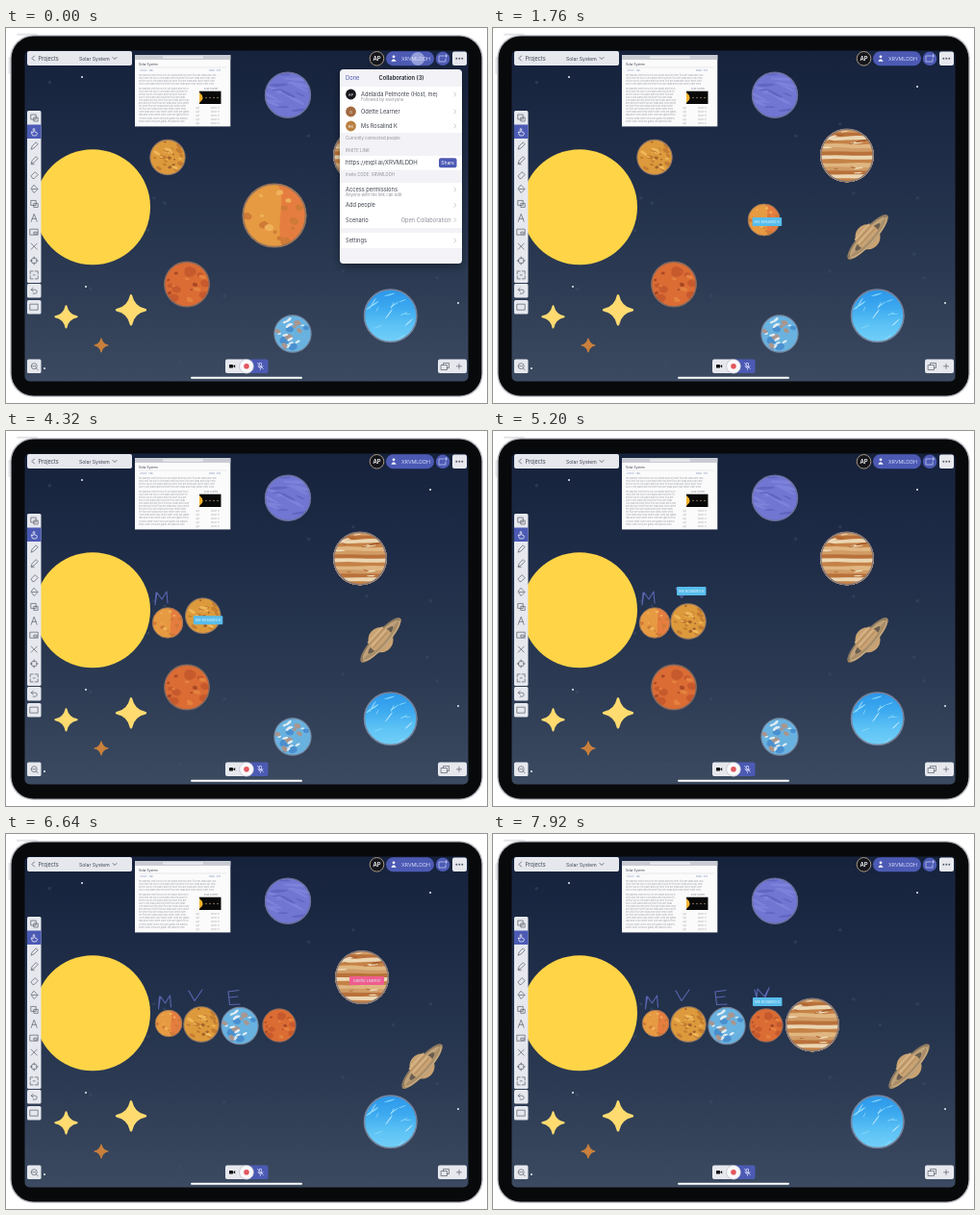
Write an HTML page that moves like this. It is 500 px wide and 390 px high and loops after 8000 ms.

```html
<!DOCTYPE html>
<html lang="en">
<head>
<meta charset="utf-8">
<title>Solar system board</title>
<style>
html, body { margin: 0; width: 100%; height: 100%; overflow: hidden; background: #fff; }
svg { display: block; width: 500px; height: 390px; }
text { font-family: Inter, "Liberation Sans", sans-serif; }
</style>
</head>
<body>
<svg id="stage" viewBox="0 0 500 390" xmlns="http://www.w3.org/2000/svg"></svg>
<script>
const LOOP = 8000;
const BLUE = '#4c5ab4', PALE = '#e6e8ee', INK = '#3f434f', GREY = '#8b8e98';
const stage = document.getElementById('stage');

// ---- helpers ----
const repeat = (n, make) => Array.from({ length: n }, (_, i) => make(i)).join('');
const rect = (x, y, w, h, fill, r = 0, extra = '') =>
  `<rect x="${x}" y="${y}" width="${w}" height="${h}" rx="${r}" fill="${fill}" ${extra}/>`;
const circle = (x, y, r, fill, extra = '') => `<circle cx="${x}" cy="${y}" r="${r}" fill="${fill}" ${extra}/>`;
const text = (x, y, size, str, fill = INK, extra = '') =>
  `<text x="${x}" y="${y}" font-size="${size}" fill="${fill}" ${extra}>${str}</text>`;
const line = (d, stroke = INK, w = .7, extra = '') =>
  `<path d="${d}" fill="none" stroke="${stroke}" stroke-width="${w}" stroke-linecap="round" stroke-linejoin="round" ${extra}/>`;
const middle = 'text-anchor="middle"';

function randomFrom(seed) {
  return () => {
    seed = (seed * 16807) % 2147483647;
    return seed / 2147483647;
  };
}

const gradient = (id, ...stops) =>
  `<linearGradient id="${id}" x2="0" y2="1">${stops.map((c, i) =>
    `<stop offset="${i / (stops.length - 1)}" stop-color="${c}"/>`).join('')}</linearGradient>`;

// ---- planets, drawn with radius 20 ----
const ball = (id, base, details, rim) =>
  `<g id="${id}"><g clip-path="url(#disc)">${circle(0, 0, 20, base)}${details}</g>` +
  circle(0, 0, 19.6, 'none', `stroke="${rim}" stroke-width="1.1"`) + '</g>';

// scattered ellipses; flat is height over width, tilt their common lean
function spots(seed, count, fill, size, flat = .75, tilt = 0) {
  const random = randomFrom(seed * 7919);
  return repeat(count, () => {
    const angle = random() * 2 * Math.PI, far = 18 * Math.sqrt(random()), rx = size * (.5 + random());
    const place = `translate(${far * Math.cos(angle)} ${far * Math.sin(angle)}) rotate(${tilt + 40 * (random() - .5)})`;
    return `<ellipse rx="${rx}" ry="${rx * flat}" transform="${place}" fill="${fill}"/>`;
  });
}

function bands(colors, count) {
  const random = randomFrom(4321), step = 40 / count;
  return repeat(count, i => {
    const y = -20 + step * i, wave = random() * 2 - 1;
    return `<path d="M-20 ${y}Q-7 ${y + wave} 0 ${y}T20 ${y}V21H-20Z" fill="${colors[i % colors.length]}"/>`;
  });
}

const art =
  ball('mercury', '#e69a42', '<path d="M2-20C8-8 0 4 5 20H22V-22Z" fill="#e67d40"/>' +
    spots(3, 9, '#cf7a36', 2.2) + spots(8, 5, '#efb25a', 2), '#94745c') +
  ball('venus', '#dd9a3c', spots(5, 12, '#c47d31', 3.4, .5, 25) + spots(11, 10, '#efb758', 2.8, .4, 25) +
    spots(17, 6, '#a5642b', 1.7), '#8d7565') +
  ball('earth', '#69b2e0', spots(4, 5, '#4a90cf', 4.5) + spots(13, 7, '#a8968f', 3.6, .7, 30) +
    spots(21, 12, '#e3edf3', 2.8, .4, -25), '#75839a') +
  ball('mars', '#da6c34', spots(6, 8, '#c75a2d', 3.6) + spots(15, 6, '#e5823f', 3, .5) + spots(23, 5, '#ab4926', 1.6), '#84685f') +
  ball('jupiter', '#d09a62', bands(['#d19c66', '#b9713a', '#ebd6b2', '#c58247', '#e0b681'], 14) +
    spots(9, 8, '#efdcbc', 3.4, .14) + spots(19, 6, '#a9602f', 3.4, .16), '#85797a') +
  ball('neptune', '#7176d2', spots(7, 9, '#7d82da', 8, .12, 12) + spots(16, 7, '#6065c0', 6, .15, 12), '#6b6f9b') +
  ball('uranus', 'url(#sea)', spots(12, 9, '#8fdcfa', 3.6, .1, -20) + spots(26, 5, '#c6edff', 3, .08, -50), '#76819a') +
  `<g id="saturn" transform="rotate(-48)"><ellipse rx="30.5" ry="7.8" fill="#8f7a60"/><ellipse rx="27" ry="6" fill="#bfa27a"/>` +
    `<ellipse rx="19" ry="4" fill="#6a5d50"/>${circle(0, 0, 13, '#c9a374')}` +
    repeat(4, i => line(`M-11 ${-8 + i * 2.6}H11`, i % 2 ? '#b28d60' : '#dcbd8f', 1.1)) +
    '<path d="M-30.5 0A30.5 7.8 0 0 0 30.5 0L20 0A20 4 0 0 1-20 0Z" fill="#a98e69"/>' +
    line('M-27 1A27 6 0 0 0 27 1', '#cfb38a', 1) + '</g>';

// ---- fixed parts ----
const spark = (x, y, s, fill) =>
  `<path transform="translate(${x} ${y}) scale(${s})" fill="${fill}" stroke="${fill}" stroke-width=".16" stroke-linejoin="round" ` +
  'd="M0-.93Q.16-.16 .93 0Q.16 .16 0 .93Q-.16 .16-.93 0Q-.16-.16 0-.93Z"/>';

const device =
  rect(2.5, 30, 2, 18, '#e4e4e7', 1) + rect(11, 5.8, 22, 2, '#e4e4e7', 1) +
  rect(4.3, 7.2, 491.4, 376.6, '#b9bbc2', 24) + rect(5.6, 8.5, 488.8, 374, '#08090b', 23) +
  rect(19.5, 23.5, 461, 344, 'url(#sky)', 5);

const random = randomFrom(99);
const scenery =
  repeat(18, () => circle(45 + 410 * random(), 50 + 300 * random(), 1.8, '#42526d', 'opacity=".4"')) +
  [[79, 51], [441, 61], [83, 269], [40, 354], [470, 286]].map(([x, y]) => circle(x, y, 1, '#e9eef5')).join('') +
  circle(90, 186.3, 60, '#ffd447') +
  spark(62.5, 300.3, 12, '#ffdb70') + spark(130, 293.3, 16, '#ffdb70') + spark(99, 330, 7.5, '#c9803c');

const words = 'the planets orbit the sun in one plane and the inner four are small and rocky while outer ones are giants '.repeat(2);
const prose = (x, y, chars, rows) => repeat(rows, i =>
  text(x, y + i * 3.1, 2.3, words.substr(i * 7, chars - (i * 5) % 4), '#9a9da5'));
const page = rect(134, 28, 99.3, 74.4, '#fbfbfc') + rect(134, 28, 99.3, 5, '#c9ccd3') + rect(163, 29.3, 42, 2.4, '#e6e8ec', 1) +
  text(138, 38.8, 3.2, 'Solar System') + line('M138 41H229', '#ccc', .4) +
  text(139, 45, 2.4, 'Article &#160; Talk', '#8797bb') + text(211, 45, 2.4, 'Read &#160; Edit', '#8797bb') +
  prose(138, 49.5, 76, 4) + prose(138, 63.5, 49, 12) +
  text(213, 63.5, 2.3, 'Solar System', GREY, middle) + rect(201, 65.7, 22.5, 13.3, '#090909') +
  '<path d="M201 67Q208 72.5 201 78Z" fill="#f6b52f"/>' + repeat(4, i => circle(208 + i * 4, 72.5, .7, '#b79a78')) +
  repeat(5, i => text(197, 84 + i * 4, 2.2, 'Age', '#aaa') + text(213, 84 + i * 4, 2.2, 'billion yr', '#aaa'));

// icon paths live in a box from -4 to 4
const icon = (d, x, y, c = '#5a5e69') => line(d, c, .7, `transform="translate(${x} ${y})"`);
const square = 'M-3-3H2V2H-3ZM0 0H4V4H0Z', pen = 'M-3 3L-2 0L2-4L4-2L0 2Z', ring = 'M-3 0A3 3 0 1 1 3 0A3 3 0 1 1-3 0';
const plus = 'M-2.5 0H2.5M0-2.5V2.5';
const tools = [square, 'M-2 3L-3 0L-1 1V-3Q0-4 .5-3V0L3 1V3L2 4H-1Z', pen, pen + 'M-3 4H0', 'M-3 1L1-3L4 0L0 4H-1Z',
  'M0-4L4 0L0 4L-3 0ZM-2 0H3', square, 'M-3 4L0-4L3 4M-2 1H2', 'M-4-3H4V3H-4ZM0 0H3V2H0Z', 'M-3-3L3 3M3-3L-3 3',
  ring + 'M0-4V-2M0 4V2M-4 0H-2M4 0H2', 'M-4-1V-4H-1M1-4H4V-1M4 1V4H1M-1 4H-4V1M-1 0H1'];
const cell = (y, d) => rect(22, y, 14.5, 14.5, PALE, 1.5) + icon(d, 29.2, y + 7.2);
const chrome =
  rect(22, 24, 109, 15, PALE, 2) + line('M29.5 29L27 31.5L29.5 34') + text(33.5, 33.7, 5.5, 'Projects') +
  text(76, 33.7, 5.1, 'Solar System') + line('M111 30.5L113 32.5L115 30.5') +
  rect(22, 86, 14.5, 179, PALE, 1.5) + rect(22, 100.5, 14.5, 14.5, BLUE) +
  tools.map((d, i) => icon(d, 29.2, 93 + i * 14.9, i === 1 ? '#fff' : undefined)).join('') +
  cell(266, 'M-1-3L-3-1L-1 1M-3-1H1A2 2 0 0 1 1 3H-1') + cell(283, 'M-4-3H4V3H-4Z') + cell(344.5, ring + 'M2 2L4 4M-1.5 0H1.5') +
  rect(228, 344.5, 22, 14.5, PALE, 2) + rect(250, 344.5, 22.5, 14.5, BLUE, 2) +
  rect(232, 350, 4, 3.6, '#111', .7) + '<path d="M236 351.8L238.2 350V353.6Z" fill="#111"/>' +
  circle(250, 351.8, 7.4, '#f8f8fa', 'stroke="#aeb2bf" stroke-width=".6"') + circle(250, 351.8, 2.8, '#e4575e') +
  icon('M-1-3H1V1H-1ZM-2.5 0Q0 5 2.5 0M0 3V4M-3-3L3 3', 264.5, 351.5, '#dfe3ff') +
  rect(449, 344.5, 30, 14.5, PALE, 2) + icon('M-4-1H2V4H-4ZM-2-1V-3H4V2H2', 456.5, 351.5) + icon(plus, 471, 351.8) +
  rect(192, 362.8, 116, 1.9, '#fff', 1) +
  circle(385.5, 31.8, 7.3, '#15161c', 'stroke="#b8a587" stroke-width=".9"') +
  text(385.5, 34, 6, 'AP', '#fff', middle + ' font-weight="600"') +
  rect(395, 24.2, 50, 15, BLUE, 7.5) + circle(403, 29.8, 1.4, '#fff') + '<path d="M400.3 34.8Q403 29.6 405.7 34.8Z" fill="#fff"/>' +
  text(411, 33.8, 5.3, 'XRVMLDDH', '#d5dafa') +
  circle(454, 31.8, 7.3, BLUE) + icon('M1-3H-4V3H3V0M2-3H5M3.5-4.5V-1.5', 454, 32, '#cfd5fa') +
  rect(464, 24.5, 15, 14.5, PALE, 2) + repeat(3, i => circle(468.3 + i * 3, 31.8, .95, '#555965'));

// ---- collaboration panel ----
const card = (y, h) => rect(347, y, 127, h, '#fff');
const note = (y, str, x = 353) => text(x, y, 4.3, str, GREY);
const row = (y, label, x = 353) => text(x, y + 2, 5.7, label) + line(`M466 ${y - 2}L467.7 ${y}L466 ${y + 2}`, '#b4b6bf');
const person = (y, name, initials, fill) => row(y, name, 369) +
  circle(358.5, y, 5.4, fill) + text(358.5, y + 1.5, 4, initials, '#fff', middle);
const panel =
  rect(347, 43, 127, 202, '#f3f3f7', 4, 'filter="url(#shadow)"') +
  text(353, 54, 5.8, 'Done', BLUE) + text(411, 54, 5.8, 'Collaboration (3)', '#22252e', middle + ' font-weight="600"') +
  card(61, 48) + card(133, 14.5) + card(161, 47) + card(213, 16) +
  person(69, 'Adelaida Pelmonte (Host, me)', 'AP', '#17181d') + note(75.5, 'Followed by everyone', 369) +
  person(87, 'Odette Learner', 'O', '#a2693f') + person(102, 'Ms Rosalind K', 'RK', '#b9803f') +
  note(116.3, 'Currently connected people') + note(129.3, 'INVITE LINK') +
  text(353, 142.3, 6, 'https://expl.ai/XRVMLDDH') + rect(450, 135.2, 18.5, 10, BLUE, 2) +
  text(459.2, 142.1, 5, 'Share', '#fff', middle) + note(154.3, 'Invite CODE: XRVMLDDH') +
  row(168, 'Access permissions') + note(175, 'Anyone with the link can edit') +
  row(184.3, 'Add people') + row(199.5, 'Scenario') + row(221, 'Settings') +
  text(462.5, 201.5, 5.7, 'Open Collaboration', GREY, 'text-anchor="end"');

// ---- motion: a home [x, y, radius], then eased moves along bowed paths ----
const FADE = { from: 5640, to: 6120 };
const before = mix => 1 - mix, after = mix => mix;
const move = (from, to, goal, by, grab = [0, 0], bow = 0) => ({ from, to, goal, by, grab, bow });
const actors = {
  neptune: { home: [293, 69.7, 24] },
  uranus: { home: [399.7, 299.3, 27.8] },
  saturn: { home: [389.5, 217.3, 20], moves: [move(6180, 6460, [432.5, 241.5, 20], 'student')] },
  earthBefore: { art: 'earth', home: [298, 318, 19.5], fade: before },
  marsBefore: { art: 'mars', home: [188, 266.5, 23.7], fade: before },
  venus: { home: [168, 134.5, 18.5], moves: [move(3920, 4390, [203, 198, 18.6], 'teacher', [3, 0], -20)] },
  mercury: { home: [279, 195, 33.3], moves: [
    move(880, 1600, [284, 199.5, 16.8], 'teacher', [1, -2.5]),
    move(1680, 2640, [168, 199.5, 16], 'teacher', [1, -2.5]),
    move(FADE.from, 6000, [169, 197, 14])] },
  earth: { home: [243, 199.5, 19.5], fade: after },
  mars: { home: [188, 266, 18], fade: after, moves: [move(5780, 6480, [284, 199, 17.5], 'teacher', [5.5, -11], 11.6)] },
  jupiter: { home: [368, 132.5, 27.8], moves: [move(6500, 7020, [332, 198.5, 27.8], 'student', [3, -1], -16.4)] },
};
const letters = {
  M: { d: 'M156 168L155 181L157 168L162 175L167 167L168 179', from: 2800, to: 3490, by: 'teacher' },
  V: { d: 'M190 163L196 173.5L204 162', from: 4480, to: 5200, by: 'teacher' },
  E: { d: 'M242 162.5L231 164L232.5 177.5L243 177M232 170L241 169', from: FADE.from, to: FADE.from + 1 },
  N: { d: 'M272 162L274 170L275 161L282 169L287 160L283 170', from: 7280, to: 7920, by: 'teacher' },
};
const hosts = {
  teacher: { label: 'Ms Rosalind K', fill: '#58bdec', width: 30.5, lead: 13 },
  student: { label: 'Odette Learner', fill: '#ef5d8f', width: 36, lead: 16 },
};

stage.innerHTML = `<defs>
  ${gradient('sky', '#16223c', '#1f2d48', '#2b3a52', '#3b4a60')}${gradient('sea', '#2b96ea', '#3ba8ef', '#5cc2f5', '#74d0f8')}
  <clipPath id="disc"><circle r="20"/></clipPath>
  <filter id="shadow" x="-20%" y="-20%" width="140%" height="140%"><feDropShadow dx="0" dy="3" stdDeviation="5" flood-opacity=".4"/></filter>
  ${art}</defs>${device}${scenery}${page}` +
  Object.entries(actors).map(([name, a]) => `<use id="${name}Actor" href="#${a.art || name}"/>`).join('') +
  Object.entries(letters).map(([name, l]) => line(l.d, '#5b66b2', 1.1, `id="${name}Letter"`)).join('') +
  chrome +
  Object.entries(hosts).map(([id, h]) =>
    `<g id="${id}">${rect(0, 0, h.width, 9, h.fill, 1)}${text(h.width / 2, 6, 4, h.label, '#d9f0fb', middle)}</g>`).join('') +
  `<g id="panel">${panel}</g>` + circle(428, 32, 7, '#dce2ff', 'id="tap"');

const $ = id => document.getElementById(id);
const progress = (t, from, to) => Math.min(1, Math.max(0, (t - from) / (to - from)));
const ease = k => k * k * (3 - 2 * k);

function pose({ home, moves = [] }, t) {
  let at = home;
  for (const { from, to, goal, bow } of moves) {
    if (t < from) break;
    const k = ease(progress(t, from, to));
    const dx = goal[0] - at[0], dy = goal[1] - at[1];
    const push = bow * 4 * k * (1 - k) / (Math.hypot(dx, dy) || 1);
    at = [at[0] + dx * k - dy * push, at[1] + dy * k + dx * push, at[2] + (goal[2] - at[2]) * k];
  }
  return at;
}

for (const [name, l] of Object.entries(letters)) {
  l.el = $(name + 'Letter');
  l.length = l.el.getTotalLength();
}

function placeTag(id, x, y, opacity = 1) {
  $(id).setAttribute('transform', `translate(${x - hosts[id].lead} ${y})`);
  $(id).setAttribute('opacity', opacity);
}

function draw(t) {
  const mix = progress(t, FADE.from, FADE.to);
  const holds = job => job.by && t >= job.from && t <= job.to + 80;
  for (const id in hosts) placeTag(id, 0, 0, 0);

  for (const [name, a] of Object.entries(actors)) {
    const [x, y, r] = pose(a, t), el = $(name + 'Actor'), opacity = a.fade ? a.fade(mix) : 1;
    el.setAttribute('transform', `translate(${x} ${y}) scale(${r / 20})`);
    el.setAttribute('opacity', opacity);
    const job = (a.moves || []).find(holds);
    if (job) placeTag(job.by, x + job.grab[0], y + job.grab[1], opacity);
  }
  for (const l of Object.values(letters)) {
    const drawn = l.length * progress(t, l.from, l.to);
    l.el.setAttribute('stroke-dasharray', `${drawn} ${l.length + 9}`);
    l.el.setAttribute('visibility', drawn ? 'visible' : 'hidden');
    if (holds(l)) {
      const tip = l.el.getPointAtLength(drawn);
      placeTag(l.by, tip.x, tip.y);
    }
  }
  letters.M.el.setAttribute('transform', `translate(${3.5 * mix} ${mix})`);
  letters.E.el.setAttribute('opacity', mix);

  $('panel').setAttribute('opacity', 1 - progress(t, 160, 480));
  $('tap').setAttribute('opacity', .5 * (1 - progress(t, 80, 320)));
}

const start = performance.now();
function tick() {
  draw((performance.now() - start) % LOOP);
  requestAnimationFrame(tick);
}
tick();
</script>
</body>
</html>
```
